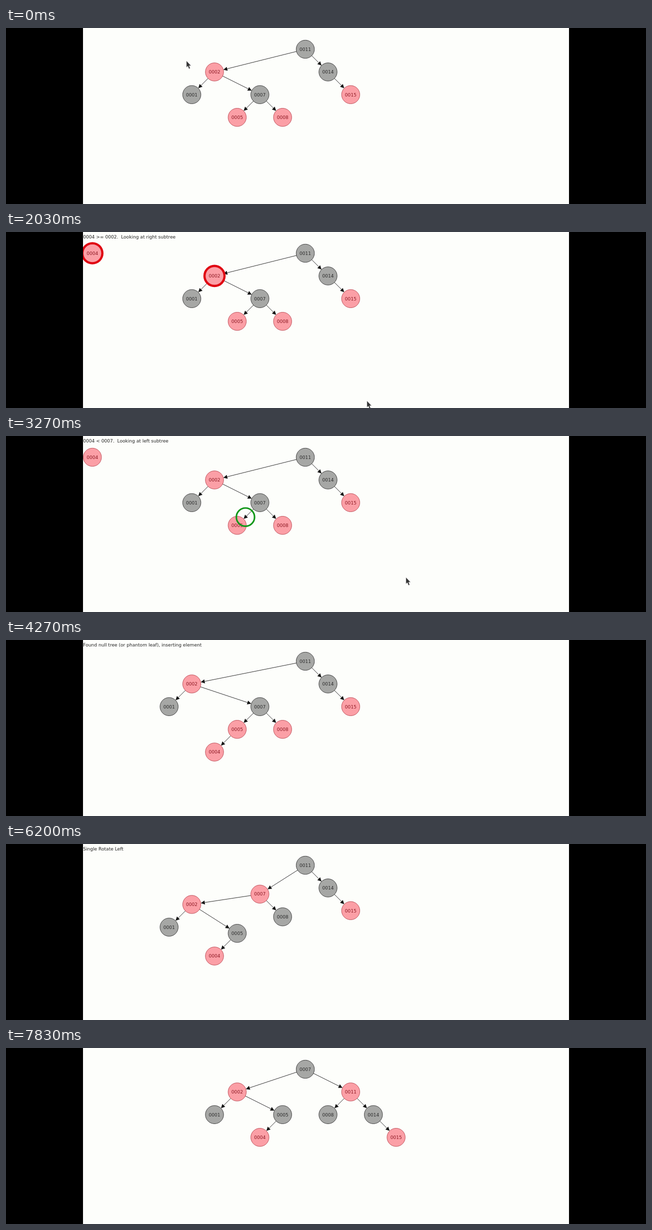
Recreate the animation shown at these times as an HTML page. Size 1280x352 px, loop 8000 ms.

```html
<!DOCTYPE html>
<html lang="en">
<head>
<meta charset="utf-8">
<title>Red-black tree insertion</title>
<style>
  html, body { margin: 0; width: 100%; height: 100%; overflow: hidden; background: #000; }
  svg { display: block; width: 100%; height: 100%; }
  text { font: 9.08px "DejaVu Sans", sans-serif; white-space: pre; }
</style>
</head>
<body>
<svg id="stage" viewBox="0 0 1280 352">
  <rect width="1280" height="352" fill="#000"/>
  <rect x="154" width="972" height="352" fill="#fdfefb"/>
  <g id="scene"></g>
  <path d="M0 0H154V352H0ZM1126 0H1280V352H1126Z" fill="#000"/>
</svg>
<script>
const LOOP = 8000, START = 830, TICK = 33.1, TICKS_PER_STEP = 11;
const ROOT_X = 598.6, ROOT_Y = 42.5, UNIT = 45.4, RADIUS = 18.2;
const NEW = 4, PIVOT = 7;
const scene = document.getElementById('scene');

// Builds a search tree; in-order rank gives the column, depth gives the row.
function grow(order) {
  const sorted = [...order].sort((a, b) => a - b);
  const tree = {};
  for (const key of order) {
    let parent, next = order[0], row = 0;
    while (tree[next]) {
      parent = next;
      next = tree[parent][key < parent ? 'left' : 'right'];
      row++;
    }
    if (parent) tree[parent][key < parent ? 'left' : 'right'] = key;
    tree[key] = { parent, row, col: sorted.indexOf(key) - sorted.indexOf(order[0]) };
  }
  return tree;
}

// Moving a key ahead of its parent in the insertion order rotates it upward.
function promote(order, key, parent) {
  const rest = order.filter(k => k !== key);
  rest.splice(rest.indexOf(parent), 0, key);
  return rest;
}

const order = [11, 2, 14, 1, PIVOT, 15, 5, 8];
const fullOrder = [...order, NEW];
const leftOrder = promote(fullOrder, PIVOT, 2);
const initial = grow(order);
const waiting = { ...initial, [NEW]: { col: -9.38, row: 0 } };
const inserted = grow(fullOrder);
const rotatedLeft = grow(leftOrder);
const rotatedRight = grow(promote(leftOrder, PIVOT, 11));

const startReds = [2, NEW, 5, 8, 15];
const pushedReds = [2, NEW, PIVOT, 15];
const finalReds = [2, NEW, 11, 15];

const pad = key => String(key).padStart(4, '0');
const compare = key => `${pad(NEW)} ${NEW < key ? '<' : '>='} ${pad(key)}.  ` +
  `Looking at ${NEW < key ? 'left' : 'right'} subtree`;
const show = (text, layout, reds, extra) => ({ text, layout, reds, ...extra });

// Compares with each key on the way down, then walks to the next one.
function search() {
  const steps = [];
  for (let key = order[0], next; key; key = next) {
    next = initial[key][NEW < key ? 'left' : 'right'];
    steps.push(show(compare(key), waiting, startReds, { rings: [key, NEW] }));
    if (next) steps.push(show(compare(key), waiting, startReds, { walk: [key, next] }));
  }
  return steps;
}

const rotate = (side, from, to) => [
  show('Single Rotate ' + side, from, pushedReds, { hot: PIVOT }),
  show('Single Rotate ' + side, to, pushedReds, { from })
];

const found = 'Found null tree (or phantom leaf), inserting element';
const bothRed = 'Node and parent are both red.  ';
const push = bothRed + 'Uncle of node is red -- push blackness down from grandparent';
const idle = show('', initial, startReds);
const steps = [
  show('Inserting ' + pad(NEW), waiting, startReds),
  ...search(),
  show(found, inserted, startReds, { from: waiting }),
  show(found, inserted, startReds),
  show(push, inserted, startReds),
  show(push, inserted, pushedReds),
  show(bothRed + 'Node is right child, parent is left child -- rotate', inserted, pushedReds),
  ...rotate('Left', inserted, rotatedLeft),
  show(bothRed + 'Can fix extra redness with a single rotation', rotatedLeft, pushedReds),
  ...rotate('Right', rotatedLeft, rotatedRight),
  show('', rotatedRight, finalReds)
];

const pointerPaths = [
  [{ t: 0, at: [361, 66] }, { t: 400, at: [190, -18] }],
  [{ t: 630, at: [250, -14] }, { t: 1430, at: [702, 102] }, { t: 2030, at: [722, 338] },
   { t: 3270, at: [800, 283] }, { t: 4030, at: [1130, 230] }]
];

const between = (a, b, p) => a.map((v, i) => v + (b[i] - v) * p);
const smooth = p => p * p * (3 - 2 * p);
const place = ({ col, row }) => [ROOT_X + col * UNIT, ROOT_Y + row * UNIT];

function edge([x1, y1], [x2, y2], hot) {
  const d = Math.hypot(x2 - x1, y2 - y1) || 1;
  const ux = (x2 - x1) / d, uy = (y2 - y1) / d;
  const tx = x2 - ux * RADIUS, ty = y2 - uy * RADIUS;
  const bx = tx - ux * 8, by = ty - uy * 8;
  const color = hot ? '#e00612' : '#161616';
  return `<path d="M${x1} ${y1}L${bx} ${by}" stroke="${color}" stroke-width="${hot ? 3 : 0.9}"/>` +
    `<path d="M${tx} ${ty}L${bx - uy * 4} ${by + ux * 4}L${bx + uy * 4} ${by - ux * 4}Z" fill="${color}"/>`;
}

function node(key, [x, y], red, ringed) {
  const [fill, line, ink] = red ? ['#fb9fa6', '#b8444f', '#8c1722'] : ['#a6a7a5', '#333', '#2b2b2b'];
  const ring = ringed ? `<circle cx="${x}" cy="${y}" r="22.3" fill="#e00612"/>` : '';
  return ring + `<circle cx="${x}" cy="${y}" r="${RADIUS}" fill="${fill}" ` +
    `stroke="${ringed ? '#e00612' : line}" stroke-width="0.9"/>` +
    `<text x="${x}" y="${y + 3.2}" text-anchor="middle" fill="${ink}">${pad(key)}</text>`;
}

function marker([x, y]) {
  return `<circle cx="${x}" cy="${y}" r="${RADIUS}" fill="none" stroke="#12981a" stroke-width="3.2"/>`;
}

function pointer(t) {
  const path = pointerPaths.find(p => t >= p[0].t && t < p[p.length - 1].t);
  if (!path) return '';
  const i = path.findIndex(stop => stop.t > t);
  const a = path[i - 1], b = path[i];
  const spot = between(a.at, b.at, smooth((t - a.t) / (b.t - a.t)));
  return `<path transform="translate(${spot})" d="M0 0V12.5L2.8 10L5 15.5L7.2 14.5L5 9.3H8.8Z" ` +
    'fill="#333" stroke="#bbb" stroke-width="0.5"/>';
}

function render(t) {
  const ticks = Math.floor((t - START) / TICK);
  const index = Math.floor(ticks / TICKS_PER_STEP);
  const progress = ticks / TICKS_PER_STEP - index;
  const step = index < 0 ? idle : steps[Math.min(index, steps.length - 1)];
  const { layout, reds, walk, hot, rings = [], from = layout } = step;

  const keys = Object.keys(layout).map(Number);
  const spots = {};
  for (const key of keys) spots[key] = between(place(from[key]), place(layout[key]), progress);

  const edges = keys.filter(key => layout[key].parent)
    .map(key => edge(spots[layout[key].parent], spots[key], key === hot));
  const nodes = keys.map(key => node(key, spots[key], reds.includes(key), rings.includes(key)));
  const text = step.text.replace('<', '&lt;').replace('>', '&gt;');
  scene.innerHTML = edges.join('') + nodes.join('') +
    (walk ? marker(between(spots[walk[0]], spots[walk[1]], progress)) : '') +
    `<text x="154.3" y="13.2" fill="#222">${text}</text>` + pointer(t);
}

const began = performance.now();
function tick() {
  render((performance.now() - began) % LOOP);
  requestAnimationFrame(tick);
}
tick();
</script>
</body>
</html>
```
